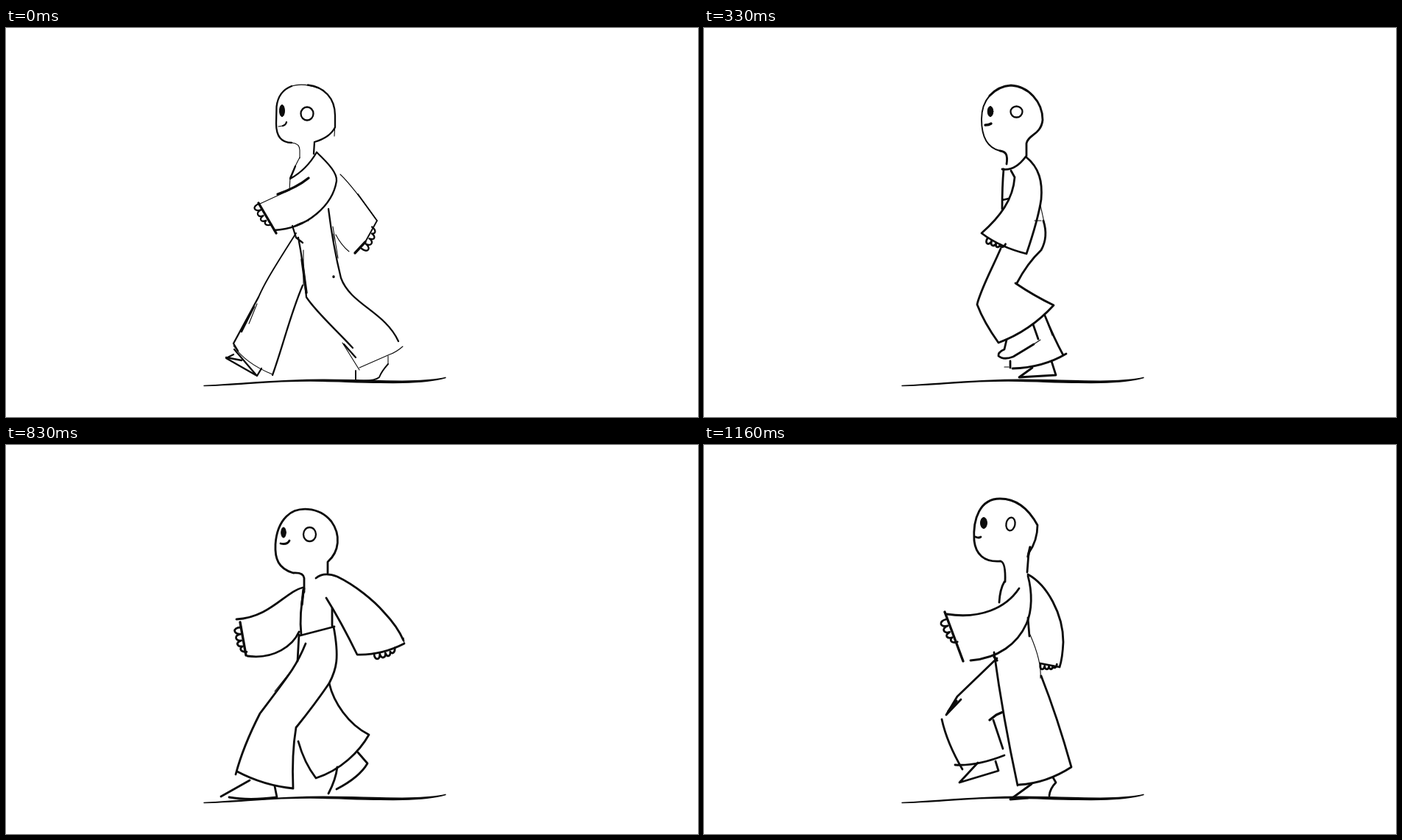
An HTML page without scripts for the animation above (1.33 s loop, 940 px wide and 529 px high).

```html
<!DOCTYPE html>
<html lang="en">
<head>
<meta charset="utf-8">
<title>Walk cycle</title>
<style>
  html, body { margin: 0; width: 100%; height: 100%; overflow: hidden; background: #fff; }
  svg { display: block; width: 100%; height: 100%; overflow: hidden; }
  path, ellipse { fill: none; stroke: #0b0b0b; stroke-width: var(--pen, 2.8); stroke-linecap: round; stroke-linejoin: round; vector-effect: non-scaling-stroke; }
  .soft { --pen: 2.3; }
  .thin { stroke-width: 1.1; }
  .light { stroke-width: 1.9; }
  .bold { stroke-width: 3.4; }
  .eye { fill: #0b0b0b; stroke-width: 1; }
  .ear { stroke-width: 2.3; }
  .ground { fill: #0b0b0b; stroke-width: 1.4; }

  /* Poses sit side by side, one stage apart; the strip jumps from one to the next. */
  .strip { animation: walk 1330ms step-end infinite; }
  @keyframes walk {
    0% { transform: translateX(0); }
    12.03% { transform: translateX(-940px); }
    24.812% { transform: translateX(-1880px); }
    37.594% { transform: translateX(-2820px); }
    49.624% { transform: translateX(-3760px); }
    62.406% { transform: translateX(-4700px); }
    75.188% { transform: translateX(-5640px); }
    87.218% { transform: translateX(-6580px); }
  }
</style>
</head>
<body>
<svg viewBox="0 0 940 529">
  <defs>
    <path id="hand" d="M0 0c-12-1-11 9-1 9c-10 1-8 9 0 9c-9 2-6 8 1 8c-6 3-2 8 5 8"/>
  </defs>

  <path class="ground" d="M269 486.500C320 484 370 478.500 430 478.300S560 484 597 475.500C560 486 500 482 430 480.300S320 486 269 486.500Z"/>

  <g class="strip">
    <!-- contact, far leg leading -->
    <g class="soft">
      <path d="M388 79C375 84 369 94 367.500 107L367 130C367 148 374 156 388 156"/>
      <path class="thin" d="M388 79Q404 74 425 82M388 156Q399 157 399 166V177M446 147L447 130"/>
      <path d="M410 77.500C432 80 447 95 447 119V135Q440 149 419 155L418 171"/>
      <ellipse class="eye" cx="375" cy="112.500" rx="3.500" ry="8"/>
      <ellipse class="ear" cx="409" cy="116.500" rx="8.500" ry="9"/>
      <path d="M376 133Q380 132 381 128"/>
      <path class="thin" d="M370 134L376 133M399 176Q393 187 386 203L385 221"/>
      <path d="M393 188L386 205Q408 193 422 169"/>
      <path d="M422 169C440 186 450 198 449 208C444 240 410 273 364 275"/>
      <path class="bold" d="M369 226Q395 217 411 204"/>
      <path class="thin" d="M345 239L384 221M388 271Q400 264 411 262"/>
      <path class="bold" d="M343 238L367 279"/>
      <use href="#hand" transform="translate(344 239) rotate(-22) scale(.95)"/>
      <path class="thin" d="M454 199Q470 214 504 262M466 304Q455 295 448 281M444 270L451 313"/>
      <path class="light" d="M478 226L504 262L488 291"/>
      <path class="bold" d="M488 291L474 306"/>
      <use href="#hand" transform="translate(483 300) rotate(-146) scale(.95)"/>
      <path d="M438 246Q444 295 455 340C468 376 515 386 533 426"/>
      <path class="thin" d="M539 433Q530 441 521 444L480 462M480 465L457 428M445 280V292M404 302V350"/>
      <path d="M389 269L394 285L403 292M397 285Q404 320 408 366C421 386 448 410 471 435M459 430L475 448"/>
      <path class="bold" d="M445 338v.5M402 315L408 360"/>
      <path class="light" d="M394 279C357 337 350 350 343 366"/>
      <path d="M343 366L309 429L315 439M320 413L337 379M362 472C377 430 386 390 403 350"/>
      <path class="thin" d="M309 432Q325 456 362 471M330 402L341 375"/>
      <path d="M309 444L299 449L341 473L347 463M299 448L320 452M310 437L340 472"/>
      <path class="thin" d="M519 446V457"/>
      <path class="light" d="M475 466V479Q500 481 507 475Q510 467 519 457"/>
    </g>

    <!-- down, far leg taking the weight -->
    <g transform="translate(940)">
      <path d="M405 190Q407 171 394 168C374 163 369 148 369 130C370 104 385 86 408 86C434 86 452 104 452 128C450 150 431 154 431 166V178"/>
      <ellipse class="eye" cx="379" cy="120" rx="3.500" ry="7.500"/>
      <ellipse class="ear" cx="414" cy="122" rx="8.500" ry="9"/>
      <path d="M373 139Q381 140 384 135"/>
      <path d="M403 190L393 216M397 205Q418 199 431 178"/>
      <path d="M431 178C452 195 454 215 446 235Q430 272 372 283M414 212Q395 238 352 247"/>
      <path class="bold" d="M350 245L371 288"/>
      <use href="#hand" transform="translate(352 248) rotate(-24) scale(.9)"/>
      <path class="light" d="M455 205Q482 235 494 275M466 305Q456 290 450 275"/>
      <path d="M494 275L467 306"/>
      <use href="#hand" transform="translate(472 301) rotate(-137) scale(.9)"/>
      <path d="M441 250Q446 290 452 325C468 362 510 375 538 402Q523 432 489 447M397 283Q404 320 410 360Q440 400 489 447"/>
      <path d="M526 423L554 436Q540 458 513 470M504 440Q507 458 502 478"/>
      <path d="M393 285Q368 325 360 362Q348 405 348 452Q372 465 411 463Q405 410 408 362"/>
      <path d="M361 459L338 478Q362 483 400 480L398 465"/>
    </g>

    <!-- passing, near leg bent -->
    <g transform="translate(1880)">
      <g id="upper">
        <path d="M402 167C385 163 377 148 377 124C377 112 381 100 388 92" class="light"/>
        <path d="M411 185C413 172 410 168 402 167M388 92Q400 79 417 78C440 79 460 100 460 125C458 145 440 145 438 157V174"/>
        <ellipse class="eye" cx="389" cy="113.500" rx="3.800" ry="7"/>
        <ellipse class="ear" cx="424.500" cy="114" rx="8" ry="7.500"/>
        <path class="bold" d="M382 132q5 0 8-2"/>
        <path d="M405 192Q422 195 437 175C456 190 460 210 458 233Q454 260 438 307Q402 298 377 279C402 257 420 233 422 203L417 194"/>
        <path d="M407 192Q405 215 405 246M405 234L414 232"/>
        <use href="#hand" transform="translate(385 286) rotate(-64) scale(.75)"/>
      </g>
      <path class="thin" d="M457 241L462 264M449 262H458"/>
      <path d="M461 262Q468 284 458 302Q439 320 425 347"/>
      <path d="M403 300C390 330 380 347 372 372L371 376Q380 400 400 428Q443 412 475 377Q448 364 423 347"/>
      <path d="M411 424L408 437Q399 441 400 446Q407 452 420 447Q435 438 448 430M447 403L454 423"/>
      <path class="thin" d="M448 430L457 424M463 391L473 418M408 461h6"/>
      <path d="M463 391Q475 421 488 445M492 443Q460 462 419 463M416 453v9"/>
      <path d="M446 462L428 475L478 472L472 453"/>
    </g>

    <!-- up, near leg raised -->
    <g transform="translate(2820)">
      <path d="M404 185C414 178 412 168 407 162C385 152 367 139 367 112C369 85 388 70 413 70C437 70 457 88 457 117C455 142 437 143 438 159V176"/>
      <path class="bold" d="M446 85Q455 96 457 110M408 162L411 174"/>
      <ellipse class="eye" cx="383" cy="99" rx="4.500" ry="8.500"/>
      <ellipse class="ear" cx="414.500" cy="107" rx="8" ry="7.500"/>
      <path d="M374 122q6 4 12-1M403 190Q420 194 435 182"/>
      <path d="M403 183L402 196L399 238V272M400 249Q428 250 449 244"/>
      <path class="bold" d="M405 250Q406 270 397 279"/>
      <path class="light" d="M346 235L357 231Q380 237 398 232M361 274Q380 281 401 274"/>
      <path class="bold" d="M356 232L361 280"/>
      <use href="#hand" transform="translate(355 232)"/>
      <path d="M438 176C470 184 483 210 518 273M422 200C455 235 470 262 477 305"/>
      <path class="thin" d="M516 269L522 276Q500 302 471 307M338 341L369 361L384 376M393 334L404 333"/>
      <use href="#hand" transform="translate(485 304) rotate(-116) scale(.9)"/>
      <path d="M450 234L456 278M450 236C460 293 440 319 380 331Q360 338 344 341"/>
      <path class="bold" d="M370 333L391 334"/>
      <path d="M396 286L358 302Q335 309 319 320Q319 370 323 424M372 291L400 277M360 343L388 385M396 387L335 423"/>
      <path d="M353 415L338 442Q370 438 389 412L377 400"/>
      <path d="M397 335L419 441M444 307Q446 330 455 355L488 440M414 449Q455 456 491 440"/>
      <path class="thin" d="M478 415L484 437"/>
      <path d="M438 451L411 476Q450 476 459 470L473 462L465 449"/>
    </g>

    <!-- contact, near leg leading -->
    <g transform="translate(3760)">
      <path d="M404 181C405 168 398 168 390 165C370 160 365 145 366 128C367 105 376 91 391 84C420 77 452 92 452 126C452 150 437 154 438 167L442 174"/>
      <ellipse class="eye" cx="379" cy="115" rx="3.500" ry="7.500"/>
      <ellipse class="thin" cx="416.500" cy="119" rx="7.500" ry="10"/>
      <path d="M415 113C407 115 406 126 414 128Q418 129 421 125"/>
      <path d="M371 132q6 2 11 0M409 186Q425 190 436 171M406 179Q398 220 399 255"/>
      <path class="thin" d="M402 190L396 216M446 288L441 322"/>
      <path class="light" d="M402 191C380 218 360 243 322 242M338 297Q380 296 396 251"/>
      <path class="bold" d="M326 247L327 296"/>
      <use href="#hand" transform="translate(325 258)"/>
      <path d="M442 174C470 176 510 215 536 247M540 246Q520 275 492 293M432 208Q465 235 493 283"/>
      <use href="#hand" transform="translate(509 283) rotate(-138) scale(.9)"/>
      <path d="M401 261L443 247"/>
      <path class="light" d="M448 244V264M398 287L401 261"/>
      <path d="M415 263C398 292 365 330 293 430M295 419L347 463Q375 415 398 388C425 362 437 340 440 322M441 252Q452 270 450 290L437 327"/>
      <path d="M313 442L271 452L315 473L338 472V459M267 447L277 459"/>
      <path class="thin" d="M275 449L308 433M293 430L305 436"/>
      <path d="M441 323Q448 350 453 364Q480 398 496 432M398 388L402 404Q420 428 438 450M427 450L470 447"/>
      <path class="thin" d="M470 447L502 441"/>
      <path d="M438 451Q428 466 408 478M472 446L477 464L459 479"/>
    </g>

    <!-- down, near leg taking the weight -->
    <g transform="translate(4700)">
      <path d="M405 200V181Q404 173 390 174C370 168 365 155 366 135C367 120 372 106 381 97C395 83 425 83 442 104C455 122 453 145 437 159V174"/>
      <ellipse class="eye" cx="377" cy="119" rx="3.300" ry="7"/>
      <ellipse class="ear" cx="412.500" cy="121.500" rx="8.500" ry="9.500"/>
      <path d="M373 134q9 2 12-4"/>
      <path d="M421 181Q432 172 450 179C475 191 500 212 513 227Q532 247 540 266"/>
      <path d="M541 270Q510 286 477 285Q455 240 435 208"/>
      <use href="#hand" transform="translate(500 284) rotate(-98) scale(.85)"/>
      <path d="M405 195Q398 230 401 258M403 194C380 199 358 235 313 237M328 287C365 292 390 272 398 254"/>
      <path class="bold" d="M318 241L326 286M404 197L402 217"/>
      <use href="#hand" transform="translate(319 248) rotate(-5)"/>
      <path d="M400 259L446 247M443 222V246M445 247C453 290 449 305 439 324Q420 352 395 383M398 258L396 294"/>
      <path d="M407 270C395 300 385 312 345 365Q322 410 312 448M314 444Q350 463 390 467Q388 420 394 384"/>
      <path class="thin" d="M389 305L365 335M541 270L540 262"/>
      <path d="M331 456L292 478M303 479Q330 484 368 479L365 464"/>
      <path d="M439 324C445 350 465 380 493 394C480 417 455 442 421 453Q405 432 397 403"/>
      <path d="M478 418L491 433Q480 452 449 468M450 438Q448 455 438 474"/>
    </g>

    <!-- passing, far leg bent -->
    <g transform="translate(5640)">
      <use href="#upper" transform="translate(-6 1)"/>
      <path d="M452 245Q461 275 456 310Q440 380 445 456M402 302Q386 370 374 452Q405 467 445 456"/>
      <path d="M388 461L362 480Q390 484 428 480L427 463"/>
      <path d="M394 325L362 364Q369 390 380 411M446 374L484 396Q470 424 445 436"/>
      <path d="M473 415L492 429Q478 450 449 460"/>
    </g>

    <!-- up, far leg raised -->
    <g transform="translate(6580)">
      <path d="M409 186Q410 160 403 158C380 160 369 148 367 130C365 100 375 73 402 73C422 73 440 85 453 109Q453 130 441 147L439 173"/>
      <path class="bold" d="M443 139L440 152"/>
      <ellipse class="eye" cx="380" cy="106" rx="4.500" ry="7.500"/>
      <ellipse class="ear" cx="416.500" cy="107.500" rx="6" ry="9" transform="rotate(10 416.500 107.500)"/>
      <path d="M369 125q4 2 7 0M408 186Q402 196 401 214"/>
      <path d="M428 195C410 222 375 237 330 230M440 178C446 200 446 225 438 243C426 270 400 290 362 293"/>
      <path class="bold" d="M327 227L352 294"/>
      <use href="#hand" transform="translate(329 237) rotate(-18)"/>
      <path d="M440 176C466 190 488 230 488 268Q487 290 483 302L457 297"/>
      <use href="#hand" transform="translate(457 299) rotate(-84) scale(.65)"/>
      <path d="M440 235L442 260"/>
      <path class="thin" d="M443 258Q459 295 457 317"/>
      <path d="M458 314Q480 370 499 438Q465 460 428 462M394 282Q406 370 426 463"/>
      <path d="M398 290L344 342L329 367L349 346M323 373Q330 405 351 441M341 435Q370 437 408 422M393 374L406 413"/>
      <path class="bold" d="M394 288l4 5M388 374L397 367L406 363M332 362L343 348"/>
      <path d="M372 432L347 459L400 443L396 430"/>
      <path d="M445 461L416 482L440 480M474 452L478 459Q470 467 469 477"/>
    </g>
  </g>
</svg>
</body>
</html>
```
